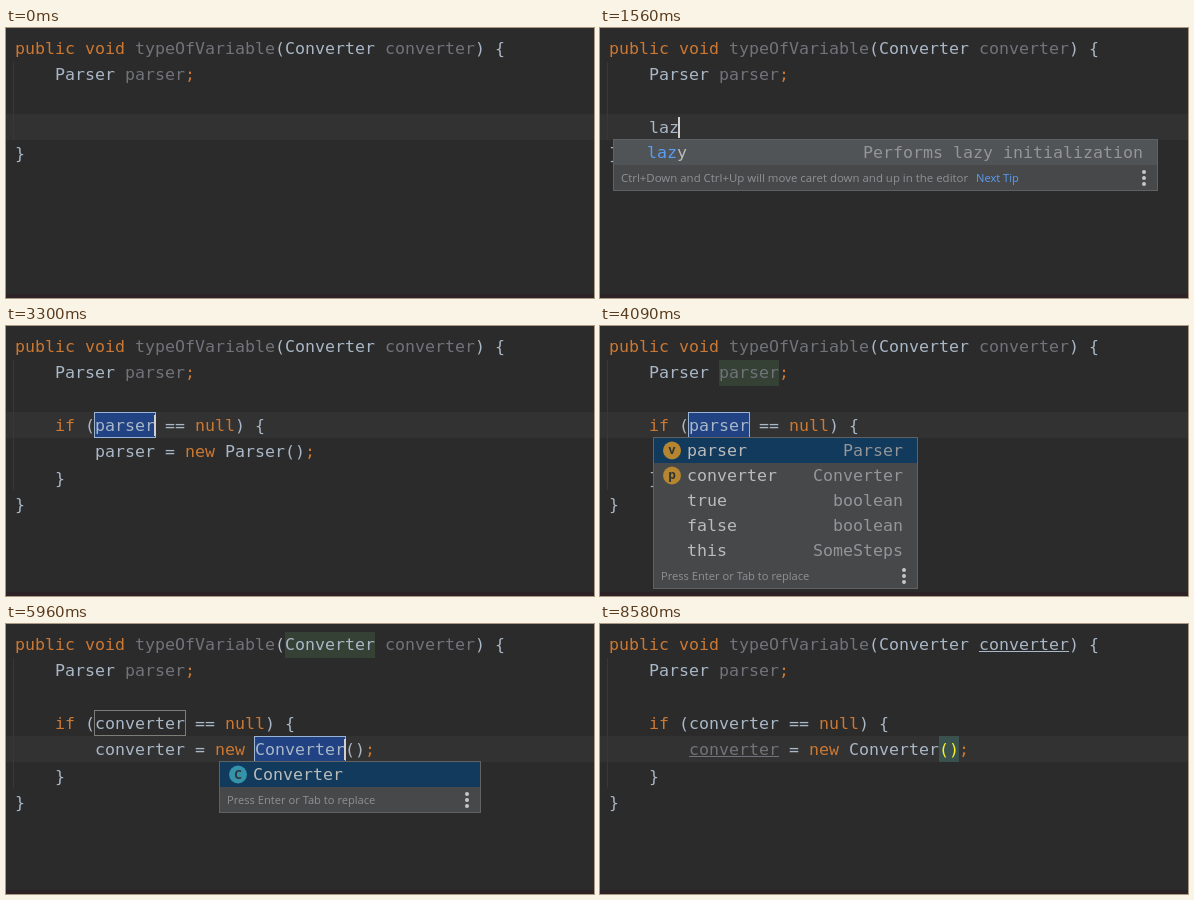
Animation, 588 px wide and 270 px high, one loop 8.98 s. Source, as an HTML page:

```html
<!DOCTYPE html>
<html lang="en">
<head>
<meta charset="utf-8">
<title>Lazy template</title>
<style>
html, body { margin: 0; width: 100%; height: 100%; overflow: hidden; background: #2b2b2b; }
svg { display: block; width: 588px; height: 270px; }
text { white-space: pre; font: 16.61px "DejaVu Sans Mono", monospace; font-variant-ligatures: none; }
.tip { font-family: "Open Sans", sans-serif; font-size: 11.15px; }
.icon { font: bold 12px "Open Sans", sans-serif; text-anchor: middle; }
</style>
</head>
<body>
<svg id="stage" viewBox="0 0 588 270"></svg>
<script>
const LOOP = 8980;
const COLORS = { k: '#cc7832', n: '#a9b7c6', g: '#72737a', y: '#ffef28' };
const BLUE = '#589df6', GRAY = '#939597', LIGHT = '#bbbbbb';
const stage = document.getElementById('stage');

const esc = s => s.replace(/&/g, '&amp;').replace(/</g, '&lt;');
const rect = (x, y, w, h, fill, extra = '') =>
  `<rect x="${x}" y="${y}" width="${w}" height="${h}" fill="${fill}" ${extra}/>`;
const text = (x, y, s, fill, extra = '') =>
  `<text x="${x}" y="${y}" fill="${fill}" ${extra}>${esc(s)}</text>`;
const frame = (x, y, w, h, fill, stroke) =>
  rect(x + .5, y + .5, w - 1, h - 1, fill, `stroke="${stroke}"`);

const colX = col => 9 + col * 10;
const rowTop = row => Math.round(7.8 + row * 26.1);
const baseline = row => Math.round(26 + row * 26.3);

// A line alternates colour keys and text: "k|new |n|Name"
function codeLine(row, line) {
  const parts = line.split('|');
  let col = 0, out = '';
  for (let i = 0; i < parts.length; i += 2) {
    const s = parts[i + 1], pad = s.length - s.trimStart().length;
    const bold = parts[i] === 'y' ? 'font-weight="bold"' : '';
    if (s.trim()) out += text(colX(col + pad), baseline(row), s.trim(), COLORS[parts[i]], bold);
    col += s.length;
  }
  return out;
}

const head = c => `k|public void |g|typeOfVariable|n|(Converter |${c}|converter|n|) {`;
const decl = 'n|    Parser |g|parser|k|;';
const typed = s => [head('g'), decl, '', 'n|    ' + s, 'n|}'];
const block = (name, type, ends = 'n|()', param = 'g', target = 'n') => [
  head(param), decl, '',
  `k|    if |n|(${name} == |k|null|n|) {`,
  `${target}|        ${name}|n| = |k|new |n|${type}|${ends}|k|;`,
  'n|    }', 'n|}'
];

// Items: [label, detail, match start, match length, icon, bold]
const lazy = n => ['lazy', 'Performs lazy initialization', 0, n];
const LIST_L = [
  lazy(1), ['long', '', 0, 1, '', true], ['lastmod', 'last modified', 0, 1],
  ['listof', 'List.of', 0, 1], ['logd', 'Log.d(TAG, String)', 0, 1],
  ['clone()', 'Object', 1, 1, 'm'], ['equals(Object obj)', 'boolean', 4, 1, 'm']
];
const LIST_LA = [
  lazy(2), ['lastmod', 'last modified', 0, 2],
  ['getClass()', 'Class<? extends SomeSteps>', 4, 2, 'm']
];
const LIST_VARS = [
  ['parser', 'Parser', 0, 0, 'v'], ['converter', 'Converter', 0, 0, 'p'],
  ['true', 'boolean'], ['false', 'boolean'], ['this', 'SomeSteps']
];
const ICONS = { m: '#b56f7d', v: '#b5852f', p: '#b5852f', c: '#3592ab' };
const TIP_MOVE = ['Ctrl+Down and Ctrl+Up will move caret down and up in the editor', 376, 11.45];
const TIP_ENTER = ['Press Enter to insert, Tab to replace', 209];
const TIP_TAB = ['Press Enter or Tab to replace'];

const wide = (items, tip) => ({ x: 13, y: 111, w: 545, textX: 47, items, tip, pick: '#505457' });
const vars = sel => ({ x: 53, y: 111, w: 265, textX: 87, items: LIST_VARS, tip: TIP_TAB, pick: '#113a5c', sel });
const classes = { x: 213, y: 137, w: 262, textX: 247, items: [['Converter', '', 0, 0, 'c']], tip: TIP_TAB, pick: '#113a5c' };

function icon(kind, x, y) {
  const glyph = kind === 'c' ? 'C' : kind;
  return `<circle cx="${x}" cy="${y}" r="9" fill="${ICONS[kind]}"/>` +
    text(x, y + (kind === 'c' ? 4.5 : 3.5), glyph, '#2f3335', 'class="icon"');
}

function bulbIcon(x, y) {
  return `<path d="M${x - 3} ${y + 5}C${x - 3} ${y + 2} ${x - 6.5} ${y + 1} ${x - 6.5} ${y - 2}` +
    `a6.5 6 0 0 1 13 0C${x + 6.5} ${y + 1} ${x + 3} ${y + 2} ${x + 3} ${y + 5}z" fill="#f0a732"/>` +
    rect(x - 3, y + 6, 6, 2.5, '#aeb0b2');
}

function popup({ x, y, w, textX, items, tip, pick, sel = 0 }, bulb) {
  const listH = items.length * 25 + 1;
  const right = x + w - 15;
  let out = frame(x, y, w, tip ? listH + 26 : listH + 30, '#46484a', '#5f6163');
  out += rect(x + 1, y + 1 + sel * 25, w - 2, 25, pick);
  items.forEach(([label, detail, at = 0, n = 0, kind, bold], i) => {
    const by = y + 19 + i * 25;
    const weight = bold ? 'font-weight="bold"' : '';
    const paren = label.indexOf('(');
    const end = paren < 0 ? label.length : paren;
    const put = (from, to, fill) => {
      if (to > from) out += text(textX + from * 10, by, label.slice(from, to), fill, weight);
    };
    put(0, at, LIGHT);
    put(at, at + n, BLUE);
    put(at + n, end, LIGHT);
    put(end, label.length, GRAY);
    if (detail) out += text(right - detail.length * 10, by, detail, GRAY);
    if (kind) out += icon(kind, textX - 15, by - 5.5);
  });
  if (!tip) return out + rect(x + 532, y + 2, 10, 180, '#636567');
  const mid = y + listH + 13;
  const [msg, linkX, size = 11.15] = tip;
  out += text(x + 8, mid + 4, msg, '#8f9193', `class="tip" style="font-size:${size}px"`);
  if (linkX) out += text(linkX, mid + 4, 'Next Tip', BLUE, 'class="tip"');
  for (const d of [-6, 0, 6]) out += `<circle cx="${x + w - 14}" cy="${mid + d}" r="2" fill="#c4c6c8"/>`;
  if (bulb) out += bulbIcon(x + w - 38, mid - 1);
  return out;
}

// Each step overrides part of the state before it
const STEPS = [
  [0, { lines: typed(''), row: 3, col: 4, caret: 0 }],
  [470, { caret: 1 }],
  [620, { lines: typed('l'), col: 5 }],
  [695, { menu: wide(LIST_L) }],
  [940, { lines: typed('la'), col: 6 }],
  [1020, { menu: wide(LIST_LA, TIP_MOVE) }],
  [1560, { lines: typed('laz'), col: 7, menu: wide([lazy(3)], TIP_MOVE) }],
  [1640, { menu: wide([lazy(3)], TIP_ENTER) }],
  [2060, { lines: typed('lazy'), col: 8, menu: wide([lazy(4)], TIP_ENTER) }],
  [2610, { caret: 0, bulb: 1 }],
  [3070, { caret: 1 }],
  [3230, { lines: block('parser', 'Parser'), menu: null, bulb: 0, col: 14, pick: [3, 8, 6] }],
  [3305, { usage: [1, 11, 6] }],
  [3380, { menu: vars(0) }],
  [4090, { caret: 0 }],
  [4560, { caret: 1 }],
  [4640, { menu: vars(1) }],
  [5100, { caret: 0 }],
  [5570, { caret: 1 }],
  [5880, { lines: block('converter', 'Converter'), menu: null, row: 4, col: 33, pick: [4, 24, 9], box: [3, 8, 9], usage: null }],
  [5960, { menu: classes, usage: [0, 27, 9] }],
  [6430, { bulb: 1 }],
  [6580, { caret: 0 }],
  [7060, { caret: 1 }],
  [7380, { menu: null, bulb: 0, pick: null, box: null, usage: null, col: 34 }],
  [7780, { lines: block('converter', 'Converter', 'y|()', 'n', 'g'), done: 1 }],
  [8580, { caret: 0 }]
];

function draw(s) {
  const last = s.lines.length - 1;
  let out = rect(0, 0, 588, 270, '#2b2b2b') + rect(0, 266, 588, 4, '#2d2226');
  out += rect(0, rowTop(s.row), 588, 26, '#323232');
  out += rect(7, 34, 1, rowTop(last) - 34, '#383838');
  if (s.usage) {
    const [row, col, n] = s.usage;
    out += rect(colX(col), rowTop(row), n * 10, 26, '#344134');
  }
  if (s.box) {
    const [row, col, n] = s.box;
    out += frame(colX(col) - 1, rowTop(row), n * 10 + 2, 26, 'none', '#7c7d78');
  }
  if (s.pick) {
    const [row, col, n] = s.pick;
    out += frame(colX(col) - 1, rowTop(row), n * 10 + 2, 26, '#214283', '#9ab4d6');
  }
  if (s.done) out += rect(339, 112, 20, 26, '#3b514d');
  s.lines.forEach((line, row) => { if (line) out += codeLine(row, line); });
  if (s.done) out += rect(379, 27, 90, 1, COLORS.n) + rect(89, 132, 90, 1, COLORS.g);
  if (s.caret) out += rect(colX(s.col) - 1, rowTop(s.row) + 3, 2, 21, '#d0d0d0');
  if (s.menu) out += popup(s.menu, s.bulb);
  stage.innerHTML = out;
}

let shown = -1;
function tick() {
  const t = performance.now() % LOOP;
  const count = STEPS.filter(([at]) => at <= t).length;
  if (count !== shown) {
    shown = count;
    draw(Object.assign({}, ...STEPS.slice(0, count).map(step => step[1])));
  }
  requestAnimationFrame(tick);
}
tick();
</script>
</body>
</html>
```
